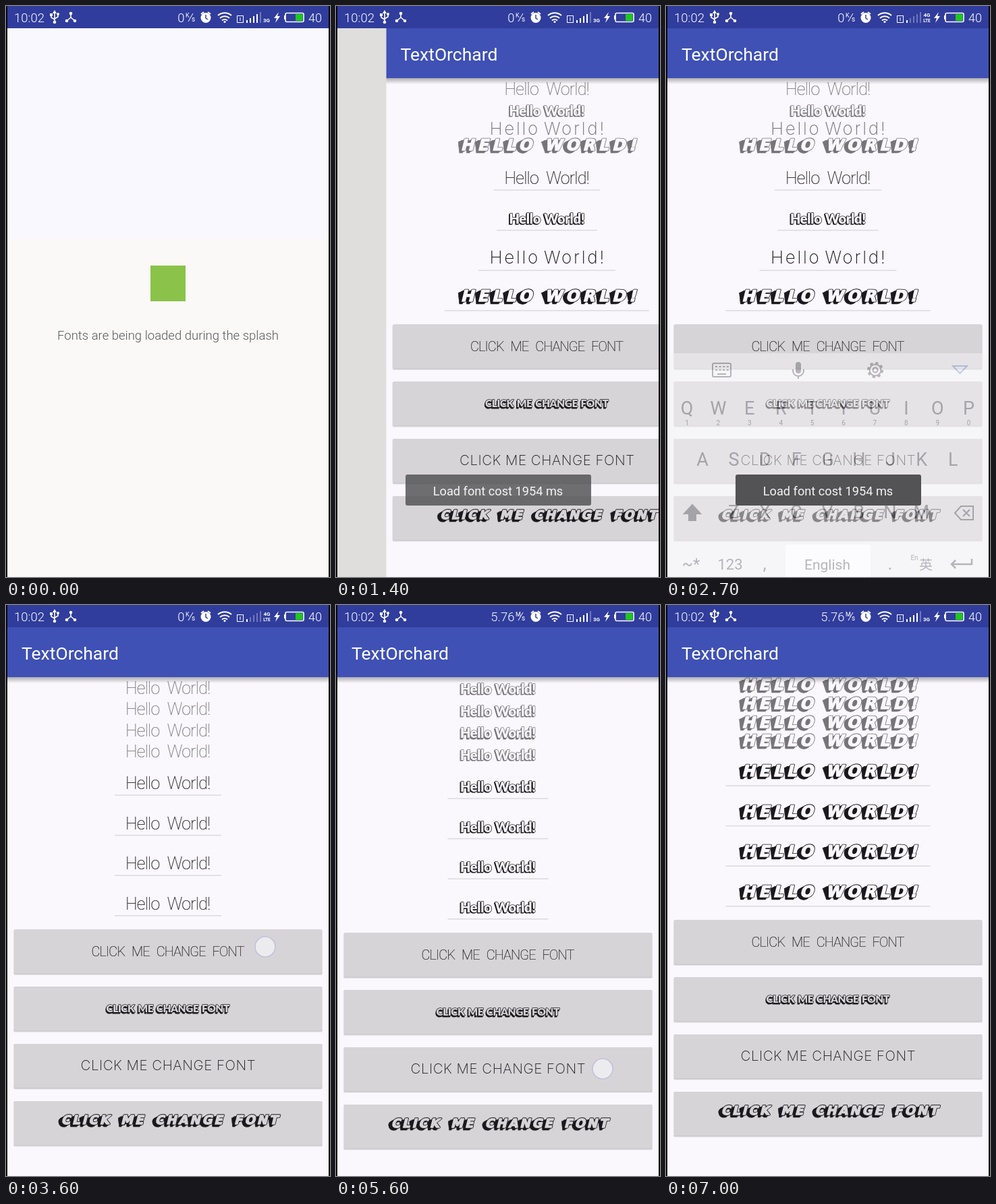
An HTML page that plays this animation: 480x847 px, repeating every 7.1 s.

```html
<!DOCTYPE html>
<html lang="en">
<head>
<meta charset="utf-8">
<title>Font switching demo</title>
<style>
  html, body { margin: 0; width: 100%; height: 100%; overflow: hidden; background: #faf8fc; }
  svg { display: block; width: 480px; height: 847px; }
  text { font-family: Roboto, sans-serif; white-space: pre; }
</style>
</head>
<body>
<svg id="stage" viewBox="0 0 480 847" xmlns="http://www.w3.org/2000/svg">
  <defs>
    <linearGradient id="shade" x2="0" y2="1">
      <stop offset="0" stop-color="#000" stop-opacity=".3"/>
      <stop offset="1" stop-color="#000" stop-opacity="0"/>
    </linearGradient>
  </defs>

  <g id="splash">
    <rect width="480" height="847" fill="#faf9f7"/>
    <rect id="tint" width="480" height="344" fill="#f9f8fe"/>
    <rect x="214" y="385" width="52" height="53" fill="#8bc34a"/>
    <text x="240" y="495" font-size="18.5" font-weight="300" text-anchor="middle" fill="#58585a">Fonts are being loaded during the splash</text>
    <rect id="scrim" width="480" height="847" fill="#000" opacity="0"/>
  </g>

  <g id="screen">
    <rect x="2" y="33" width="476" height="814" fill="#faf8fc"/>
    <g id="pages"></g>
    <rect x="2" y="107" width="476" height="9" fill="url(#shade)"/>
    <rect x="2" y="33" width="476" height="74" fill="#3f51b5"/>
    <text x="23" y="80.5" font-size="26.5" fill="#fff">TextOrchard</text>
  </g>

  <g id="keyboard">
    <rect x="2" y="515" width="476" height="400" fill="#f4f3f5"/>
    <rect x="177" y="799" width="126" height="60" rx="3" fill="#fff"/>
    <g id="keys" fill="#747378" text-anchor="middle"></g>
    <g fill="none" stroke="#747378" stroke-width="2">
      <rect x="69" y="530" width="27" height="20" rx="2"/>
      <path d="M73 535H93M73 540H93" stroke-dasharray="3 2.6"/>
      <path d="M76 546H89"/>
      <path d="M188 539v2a8 8 0 0 0 16 0v-2M196 549v4"/>
      <rect x="193" y="529" width="6" height="15" rx="3" fill="#747378"/>
      <circle cx="310" cy="540" r="10.5" stroke-width="3" stroke-dasharray="4.2 4.05"/>
      <circle cx="310" cy="540" r="8.5"/>
      <circle cx="310" cy="540" r="3.5"/>
      <path d="M425 534H446L435.500 545Z" stroke="#8ea4d8"/>
      <path d="M39 740L51 753H44V763H34V753H27Z" fill="#747378"/>
      <path d="M437 742H455V762H437L428 752ZM440 747L450 757M450 747L440 757"/>
      <path d="M453 820V828H423M429 822L423 828L429 834" stroke-width="2.500"/>
    </g>
  </g>

  <g id="toast">
    <rect x="103" y="695" width="275" height="46" rx="3" fill="#535254"/>
    <text x="240" y="725.5" font-size="18.2" text-anchor="middle" fill="#f4f4f4">Load font cost 1954 ms</text>
  </g>

  <circle id="touch" r="15" fill="#ececee" stroke="#c2c1dc" stroke-width="1.6"/>

  <g id="status" fill="#fff">
    <rect width="480" height="33" fill="#303d9c"/>
    <g font-size="18.5" font-weight="300">
      <text x="12" y="24">10:02</text>
      <text id="speed" x="264.500" y="24" text-anchor="end">0</text>
      <text x="448" y="24" font-size="18">40</text>
    </g>
    <text id="unit" x="266" y="16.500" font-size="9">K</text>
    <text x="275" y="23" font-size="10">s</text>
    <path d="M270 23L277 11" stroke="#fff"/>
    <g fill="none" stroke="#fff" stroke-width="1.6">
      <path d="M72 9V24M67 14V17L72 20M77 13V16L72 19"/>
      <path d="M96 11V17L90 22M96 17L102 22"/>
      <path d="M314 14a15 15 0 0 1 20 0M317 18a10.500 10.500 0 0 1 14 0M320 21.500a6 6 0 0 1 8 0" stroke-width="2"/>
      <rect x="342.500" y="14.500" width="9" height="10" stroke-width="1"/>
      <path d="M347 17V22" stroke-width="1"/>
      <path d="M289 12L293 9M303 12L299 9" stroke-width="2"/>
      <rect x="414" y="10.500" width="27" height="13" rx="2"/>
    </g>
    <path d="M72 6L75 11H69ZM65 11h4v4h-4Z"/>
    <circle cx="77" cy="12" r="2"/><circle cx="72" cy="24" r="2.300"/>
    <circle cx="96" cy="11" r="2.300"/><circle cx="90" cy="22" r="2.300"/><circle cx="102" cy="22" r="2.300"/>
    <circle cx="296" cy="17.500" r="7.500"/>
    <path d="M296 13V18L299 20" fill="none" stroke="#303d9c" stroke-width="1.500"/>
    <circle cx="324" cy="23.500" r="1.600"/>
    <g id="bars"></g>
    <text id="net3" x="381" y="24" font-size="8" font-weight="700">3G</text>
    <g id="net4" font-size="8" font-weight="700" text-anchor="middle">
      <text x="386.500" y="16">4G</text><text x="386.500" y="24" font-size="6.500">LTE</text>
    </g>
    <path d="M404 9L397 18H401L399 25L406 15H402Z"/>
    <rect x="412" y="14" width="2" height="6"/>
    <rect x="429" y="12" width="10.500" height="10" fill="#1fc71f"/>
  </g>
  <path d="M0 0H2V847H0ZM478 0H480V847H478Z" fill="#000"/>
</svg>

<script>
const LOOP = 7100, STEP = 100;
const PAPER = '#faf8fc', BUTTON = '#d6d4d7', INK = '#1c1a1e', SOFT_INK = '#77757a';
const $ = id => document.getElementById(id);

function add(parent, tag, attrs, content) {
  const node = document.createElementNS('http://www.w3.org/2000/svg', tag);
  for (const key in attrs) node.setAttribute(key, attrs[key]);
  if (content) node.textContent = content;
  return parent.appendChild(node);
}
const show = (node, on) => { node.style.display = on ? '' : 'none'; };
const clamp = v => Math.max(0, Math.min(1, v));

// label and button: [size, letter spacing, word spacing]
const FACES = {
  A: { family: 'Roboto, sans-serif', weight: 200, label: [25, -0.75, 6], button: [20, -0.9, 6], line: 158, rise: 9, drop: 39.5 },
  B: { family: 'Lato, sans-serif', weight: 900, label: [20, -0.3, 1], button: [15.5, -0.45, 1.5], line: 149, rise: 10, drop: 38 },
  C: { family: 'Inter, sans-serif', weight: 200, label: [26, 2.7, -4], button: [20.5, 0.5, 0], line: 203, rise: 10.5, drop: 38.5 },
  D: { family: 'DejaVu Sans, sans-serif', weight: 700, label: [23, 5.6, 0], button: [18, 3.1, 5], line: 303, rise: 14, drop: 34 }
};

function lettering(parent, kind, size, text, y, ink, ground) {
  const face = FACES[kind], [px, gap, space] = face[size];
  const caps = kind === 'D' ? text.toUpperCase() : text;
  const group = add(parent, 'g', {
    'text-anchor': 'middle', 'font-size': px, 'font-weight': face.weight,
    'letter-spacing': gap, 'word-spacing': space, 'stroke-linejoin': 'round'
  });
  const layer = (dx, dy, skew, color, width) => {
    const node = add(group, 'text', {
      transform: `translate(${240 + gap / 2 + dx} ${y + dy}) skewX(${skew})`,
      fill: color, stroke: color, 'stroke-width': width
    }, caps);
    node.style.fontFamily = face.family;
  };
  if (kind === 'B') {
    layer(-1.2, 1.2, 0, ink, 1.2);
    layer(0, 0, 0, ink, 1.4);
    layer(0, 0, 0, ground, 0);
  } else if (kind === 'D') {
    for (let k = 5; k > 0; k--) layer(2 - k * 0.8, k * 0.8, k * 4 - 14, ink, 0.6);
    layer(2, 0, -14, ink, 3.2);
    layer(2, 0, -14, ground, 1.5);
  } else {
    layer(0, 0, 0, ink, kind === 'A' ? 0.2 : 0);
  }
}

function page(kinds, labelYs, lineY, ripple) {
  const group = add($('pages'), 'g', {});
  [...kinds].forEach((kind, i) => {
    const face = FACES[kind], y = lineY + 59.6 * i;
    lettering(group, kind, 'label', 'Hello World!', labelYs[i], SOFT_INK, PAPER);
    lettering(group, kind, 'label', 'Hello World!', y - face.rise, INK, PAPER);
    add(group, 'rect', { x: 240 - face.line / 2, y: y - 0.7, width: face.line, height: 1.5, fill: '#dcdadf' });
  });
  [...'ABCD'].forEach((kind, i) => {
    const top = lineY + 199.5 + 84.8 * i;
    const box = { x: 12, y: top, width: 456, height: 65, rx: 2 };
    add(group, 'rect', { ...box, x: 11, width: 458, height: 67.5, fill: '#000', opacity: 0.1 });
    add(group, 'rect', { ...box, height: 66.3, fill: '#cac8cc' });
    add(group, 'rect', { ...box, fill: BUTTON });
    if (ripple && i === 1) {
      const wave = add(group, 'g', { id: 'ripple' });
      const clip = add(wave, 'clipPath', { id: 'pressed' });
      add(clip, 'rect', box);
      add(wave, 'rect', { ...box, fill: '#d0d0cf' });
      add(wave, 'circle', { cx: 274.5, cy: top + 32, r: 176, fill: '#c9c7ca', 'clip-path': 'url(#pressed)' });
      add(wave, 'circle', { cx: 388, cy: top + 32, r: 14, fill: '#cfcdcf' });
    }
    lettering(group, kind, 'button', 'CLICK ME CHANGE FONT', top + FACES[kind].drop, INK, BUTTON);
  });
  return group;
}

const rows = (first, pitch) => [0, 1, 2, 3].map(i => first + pitch * i);
const pages = [
  [0, page('ABCD', [132, 163, 191, 214], 273)],
  [3500, page('AAAA', rows(132, 31.3), 282)],
  [4700, page('BBBB', rows(132, 32.7), 287, true)],
  [5800, page('CCCC', rows(128, 25), 257.5)],
  [6400, page('DDDD', rows(126, 27.8), 268)]
];

function keyRow(keys, x, y, size = 27) {
  [...keys].forEach((key, i) => add($('keys'), 'text', { x: x + 46.4 * i, y, 'font-size': size }, key));
}
keyRow('QWERTYUIOP', 31, 606);
keyRow('1234567890', 31, 622, 10);
keyRow('ASDFGHJKL', 54, 682);
keyRow('ZXCVBNM', 100, 760);
[['~*', 37, 24], ['123', 95, 22], [',', 146, 26], ['English', 239, 21], ['.', 332, 26], ['英', 385, 20], ['En', 368, 10]]
  .forEach(([key, x, size]) => add($('keys'), 'text', { x, y: size === 10 ? 822 : 836, 'font-size': size }, key));

const bars = [0, 1, 2, 3, 4].map(i =>
  add($('bars'), 'rect', { x: 356 + 5 * i, y: 21 - 3 * i, width: 2, height: 4 + 3 * i }));

// Touches: [from, to, x, y]
const touches = [
  [3400, 3700, 384, 507], [4500, 4700, 388, 603],
  [5600, 5800, 395, 688], [6200, 6400, 403, 758]
];

function draw(t) {
  const left = 1 - clamp((t - 900) / 820);
  show($('tint'), t < 300);
  show($('screen'), t >= 1000);
  $('screen').setAttribute('transform', `translate(${476 * left * left} 0)`);
  $('scrim').setAttribute('opacity', 0.11 * clamp((t - 900) / 400));

  pages.forEach(([from, node], i) => {
    const next = pages[i + 1];
    show(node, t >= from && (!next || t < next[0]));
  });
  show($('ripple'), t < 5600);

  const enter = clamp((t - 1400) / 300), leave = clamp((t - 2500) / 300);
  show($('keyboard'), enter > 0 && leave < 1);
  $('keyboard').setAttribute('opacity', enter * (1 - 0.75 * leave));
  $('keyboard').setAttribute('transform', `translate(0 ${30 * (1 - enter) + 30 * leave - 20})`);

  const toast = clamp((t - 1200) / 240) * (1 - clamp((t - 2900) / 400));
  show($('toast'), toast > 0);
  $('toast').setAttribute('opacity', toast);

  const touch = touches.find(([from, to]) => t >= from && t < to);
  show($('touch'), touch);
  if (touch) $('touch').setAttribute('transform', `translate(${touch[2]} ${touch[3]})`);

  const fast = t >= 5600, lte = t >= 2300 && !fast;
  $('speed').textContent = fast ? '5.76' : '0';
  $('unit').textContent = fast ? 'M' : 'K';
  show($('net3'), !lte);
  show($('net4'), lte);
  bars.forEach((bar, i) => bar.setAttribute('opacity', i > (lte ? 0 : 3) ? 0.3 : 1));
}

const start = performance.now();
function tick() {
  const t = (performance.now() - start) % LOOP;
  draw(Math.floor(t / STEP) * STEP);
  requestAnimationFrame(tick);
}
tick();
</script>
</body>
</html>
```
